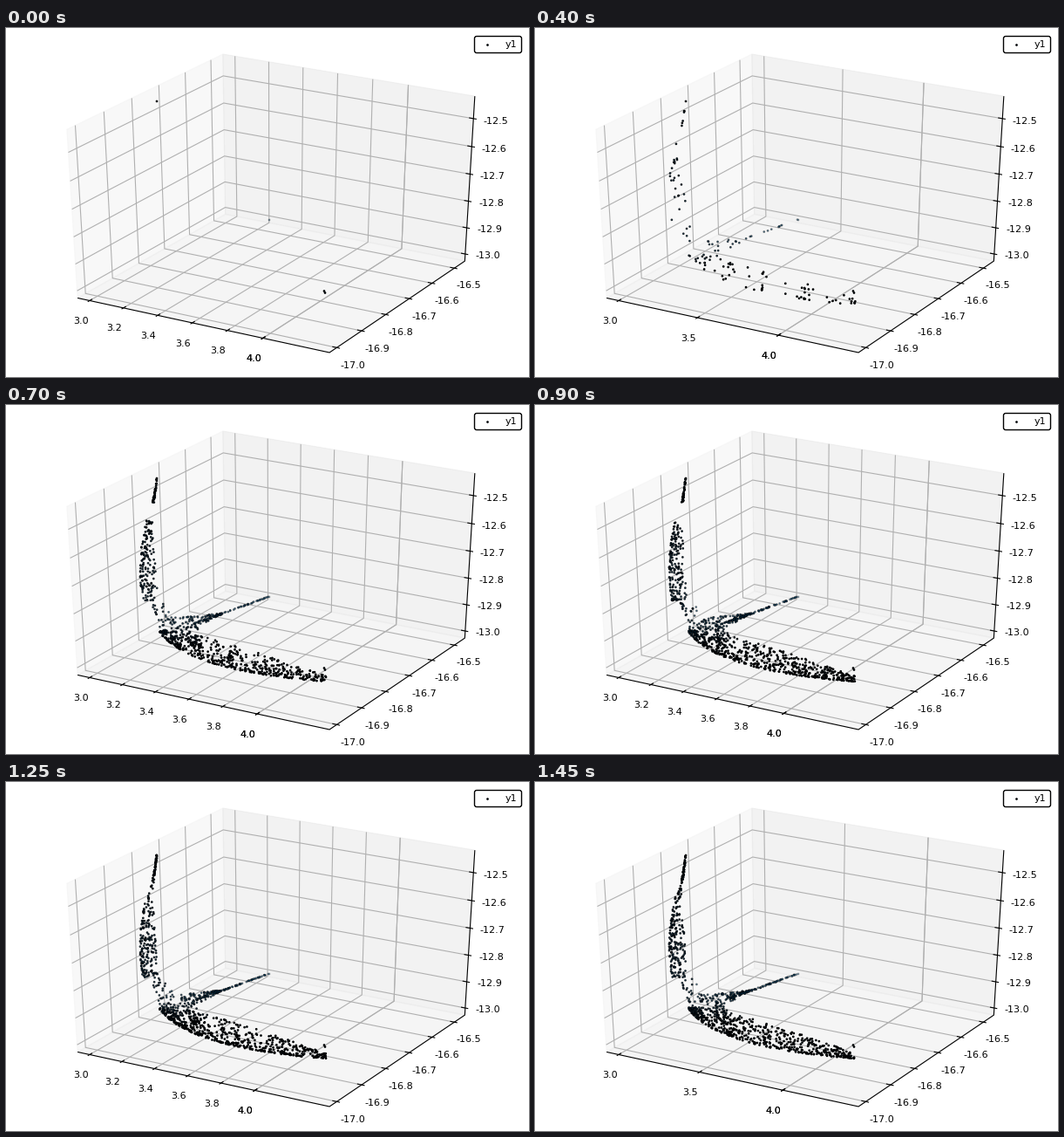
Write a matplotlib script that moves like this. It is 600 by 400 pixels and loops after 1.5 s.

```python
import numpy as np
import matplotlib.pyplot as plt
from matplotlib.animation import FuncAnimation
from matplotlib.collections import LineCollection
from matplotlib.patches import FancyBboxPatch, Polygon

W, H, FRAMES, STEP_MS = 600, 400, 30, 50
DIST = 9.6          # camera distance in box widths
LO, HI = -0.5, 0.5  # box limits

plt.rcParams["font.family"] = "DejaVu Sans"
fig = plt.figure(figsize=(W / 100, H / 100), dpi=100, facecolor="white")
ax = fig.add_axes([0, 0, 1, 1])
ax.set(xlim=(0, W), ylim=(H, 0))
ax.axis("off")


def project(x, y, z):
    """Perspective view from azimuth -60, elevation 30, in stage pixels."""
    right = 0.866 * x + 0.5 * y
    up = -0.25 * x + 0.433 * y + 0.866 * z
    w = 1 - (0.433 * x - 0.75 * y + 0.5 * z) / DIST
    return 307.8 + 333.6 * right / w, 194.9 - 220.5 * up / w


def path(*points):
    return [project(*p) for p in points]


def label(x, y, text):
    return ax.text(x, y + 4, text, fontsize=8, ha="center", va="baseline", zorder=5)


def lines(segments, color, z):
    return ax.add_collection(
        LineCollection(segments, colors=color, linewidths=0.8, zorder=z))


def x_grid(x):
    return path((x, HI, HI), (x, HI, LO), (x, LO, LO))


def x_tick(x):
    return path((x, LO - 0.012, LO), (x, LO + 0.017, LO))


# Panes
panes = [
    (0.95, [(LO, LO, LO), (LO, HI, LO), (LO, HI, HI), (LO, LO, HI)]),
    (0.90, [(LO, HI, LO), (HI, HI, LO), (HI, HI, HI), (LO, HI, HI)]),
    (0.925, [(LO, LO, LO), (HI, LO, LO), (HI, HI, LO), (LO, HI, LO)]),
]
for grey, corners in panes:
    tone = (grey, grey, grey, 0.5)
    ax.add_patch(Polygon(path(*corners), fc=tone, ec=tone, lw=0.8, zorder=1))

# Fixed y and z grids, ticks and labels
grid, ticks = [], []
for k in range(6):
    y = -0.45 + 0.1734 * k
    grid.append(path((LO, y, HI), (LO, y, LO), (HI, y, LO)))
    ticks.append(path((HI - 0.017, y, LO), (HI + 0.012, y, LO)))
    px, py = project(HI, y, LO)
    label(px + 18.2 - 0.4 * k, py + 20 - 0.2 * k, f"{-17 + k / 10:.1f}")

    z = -0.455 + 0.165 * k
    grid.append(path((LO, LO, z), (LO, HI, z), (HI, HI, z)))
    ticks.append(path((HI - 0.017, HI, z), (HI + 0.012, HI, z)))
    px, py = project(HI, HI, z)
    label(px + 26.4 - 0.2 * k, py + 1 + 0.3 * k, f"{-13 + k / 10:.1f}")
lines(grid, "#b0b0b0", 2)
lines(ticks, "black", 4)
lines([path((LO, LO, LO), (HI, LO, LO), (HI, HI, LO), (HI, HI, HI))], "black", 4)

# Moving x axis
x_lines = lines([], "#b0b0b0", 2)
x_marks = lines([], "black", 4)
x_labels = [label(0, 0, "") for _ in range(7)]

# Legend
ax.add_patch(FancyBboxPatch((537.5, 9.5), 54, 19, fc="white", ec="black", lw=1,
                            boxstyle="round,pad=0,rounding_size=2.5", zorder=6))
ax.text(572.8, 22.3, "y1", fontsize=8, va="baseline", zorder=7)
BLUE = (0, 0.604, 0.98)
dot = dict(s=1.2, linewidths=0.85)
ax.scatter([552], [18.7], color=[BLUE], edgecolors="black", zorder=7, **dot)
cloud = ax.scatter([], [], zorder=8, **dot)

# The cycle that is present from the start
CYCLE = np.array([(173, 84), (302, 220), (365, 301.5), (366, 303.5)])

# Strips of the attractor: point count, side they widen to,
# and three Bezier keys (x, y, width) for the edge
STRIPS = [
    (45, (1, 0), [(172.5, 84, 1), (171, 98, 1), (168, 112, 2)]),
    (185, (1, 0), [(161, 132, 7), (149, 180, 23), (157, 224, 17)]),
    (38, (1, 0.1), [(165, 222, 16), (172, 240, 28), (178, 262, 12)]),
    (110, (0, 1), [(187, 244, 20), (215, 243, 16), (247, 238.5, 1)]),
    (40, (1, 0), [(206, 250, 14), (207, 264, 14), (214, 278, 12)]),
    (95, (0, 1), [(213, 251, 2), (250, 238, 1), (301, 219.5, 1)]),
    (560, (0.1, -1), [(176, 260, 2), (208, 305, 50), (367, 317, 6)]),
]
LINK = (1, 0), [(168, 112, 2), (166, 122, 2), (162, 134, 6)]


def bezier(s, keys):
    a, b, c = np.array(keys, float)
    s = s[:, None]
    return a * (1 - s) ** 2 + 2 * b * s * (1 - s) + c * s ** 2


def strip(rng, n, clump, side, keys):
    s = rng.random(n) ** 0.8
    turns = 10 * np.pi
    s = s - clump * np.sin(turns * s) / turns  # gather at even stations
    x, y, width = bezier(s, keys).T
    reach = width * rng.random(n) ** 1.6       # denser along the edge
    return np.column_stack([x + side[0] * reach, y + side[1] * reach])


def attractor(f):
    rng = np.random.default_rng(f)
    share = 1 / (1 + np.exp(0.65 * (11 - f)))
    clump = 1 - share ** 2
    parts = [strip(rng, round(n * share), clump, side, keys)
             for n, side, keys in STRIPS]
    late = max(0, (f - 18) / 11)
    parts.append(strip(rng, round(18 * late), 0, *LINK))
    return np.vstack([CYCLE, *parts])


def shade(p):
    """Opacity falls with distance from the viewer."""
    x, y = p.T
    floor = 0.38 + 0.011 * (y - 220)
    wall = 0.95 - 0.0012 * (y - 84)
    return np.clip(np.where(x < 183, np.maximum(floor, wall), floor), 0.38, 1)


def update(f):
    # Box width taken by one unit of x, which follows the widest point
    unit = np.interp(f, [0, 5, 11, 14, 18, 25, 29],
                     [0.6945, 0.64, 0.644, 0.672, 0.663, 0.663, 0.659])
    n = 6 if unit > 0.6605 else 3
    values = list(np.linspace(3, 4, n)) + [4.0]  # the last tick is doubled
    xs = [-0.45 + unit * (v - 3) for v in values]
    x_lines.set_segments([x_grid(x) for x in xs])
    x_marks.set_segments([x_tick(x) for x in xs])
    for text in x_labels:
        text.set_visible(False)
    for text, x, value in zip(x_labels, xs, values):
        px, py = project(x, LO, LO)
        text.set_position((px - 10.7 - 0.8 * x, py + 26.6))
        text.set_text(f"{value:.1f}")
        text.set_visible(True)

    points = attractor(f)
    alpha = shade(points)
    face = np.column_stack([np.tile(BLUE, (len(points), 1)), alpha])
    edge = np.column_stack([np.zeros((len(points), 3)), alpha])
    cloud.set_offsets(points)
    cloud.set_facecolor(face)
    cloud.set_edgecolor(edge)
    return [x_lines, x_marks, cloud, *x_labels]


anim = FuncAnimation(fig, update, frames=FRAMES, interval=STEP_MS,
                     repeat=True, repeat_delay=0)
plt.show()
```
